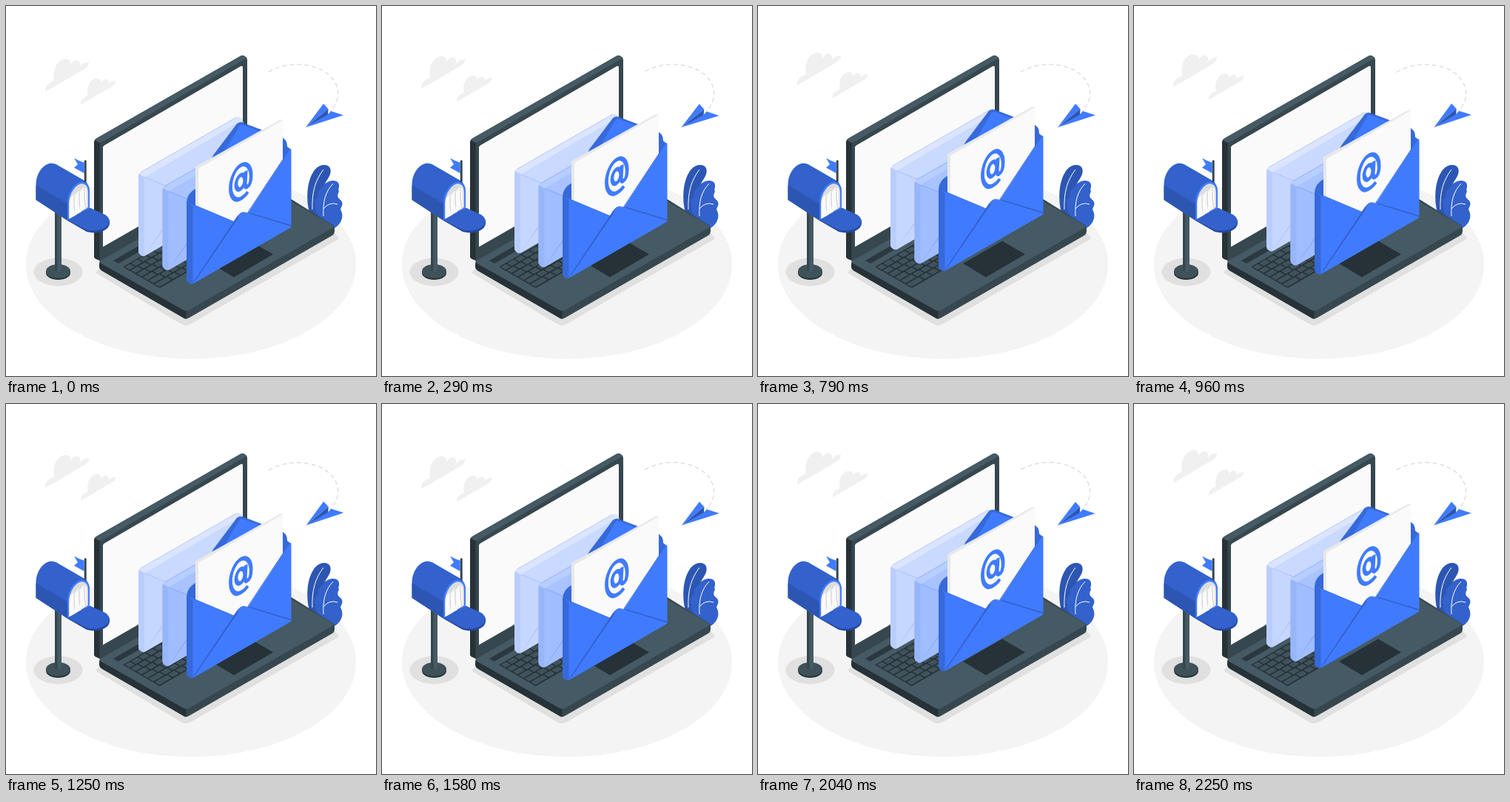
Recreate the animation shown at these times as an HTML page. Size 500 px wide and 500 px high, loop 2290 ms.

```html
<!DOCTYPE html>
<html lang="en">
<head>
<meta charset="utf-8">
<title>Mail</title>
<style>
html, body { margin: 0; width: 100%; height: 100%; overflow: hidden; background: #fff; }
svg { display: block; width: 100%; height: 100%; }
</style>
</head>
<body>
<svg id="stage" viewBox="0 0 500 500">
  <ellipse cx="250" cy="349" rx="223" ry="128" fill="#f4f4f4"/>
  <ellipse cx="70.5" cy="359.5" rx="33" ry="19" fill="#e0e0e0"/>
  <path d="M122 361Q121 358 127 355L443 307Q450 311 449 315L249 430Q243 433.500 237 430Z" fill="#e0e0e0"/>

  <defs>
    <path id="cloud" fill="#f0f0f0" d="M53 116C52 109 57 104 65 101C63 88 67 75 78 72C85 70.500 88 75 87 80C90 74 96 71.500 99 75C101 78 100 81 99 83C102 78 108 75 112 76C112 80 110 83 106 85L62 111C58 113 56 114 53 116Z"/>
  </defs>
  <g class="float" data-rise="10">
    <use href="#cloud"/>
    <use href="#cloud" transform="translate(58.600 40.400) scale(.8)"/>
  </g>

  <g id="plane">
    <path d="M355 89C373 79 392 77 411 81C438 87 452 106 448 125C446 132 443 137 438 142" fill="none" stroke="#e0e0e0" stroke-width="1.500" stroke-dasharray="6 4"/>
    <path d="M405 164L429 132L435.500 139Z" fill="#407bff"/>
    <path d="M405 164L435.500 139L435 147.500Z" fill="#2d56b3"/>
    <path d="M405 164L434.500 147L439 142L456 147.500Z" fill="#407bff"/>
  </g>

  <g id="plant">
    <path d="M411 283C405 262 406 238 416 223C424 212 437 213 438.500 221C440 231 431 235 430 245C431 255 427 275 421 287Z" fill="#2d56b3"/>
    <path d="M414 275C413 252 418 235 429 221" fill="none" stroke="#fff" stroke-width="1"/>
    <path d="M423 286C415 272 416 260 422 257C421 247 427 246 429 243C434 235 446 234 449 239C452 244 448 247 450 251C447 256 448 259 452 262C457 267 453 271 452 275C456 281 456 293 444 300Z" fill="#3362cc"/>
    <path d="M429 284C428 266 431 251 442 240M429 274Q437 264 448 268" fill="none" stroke="#fff" stroke-width="1"/>
  </g>

  <g id="laptop">
    <path d="M127 339L326 224L440 295Q444 297 444 301V305Q444 308 441 310L248 421Q243.500 424 239 421L130 358Q126 355.500 126 352Z" fill="#37474f"/>
    <path d="M126 347L243.500 411V423Q241 422.700 239 421L130 358Q126 355.500 126 352Z" fill="#263238"/>
    <path d="M128 344L326 230L440 295.500Q444 298 440 300.500L248 410.500Q243.500 413 239 410.500L129 348Q126 346 128 344Z" fill="#455a64"/>
    <path d="M145 344L320 243L327 247L152 348Z" fill="#2b383f"/>
    <g id="keys" transform="matrix(.866 -.5 .866 .5 158 352.500)"></g>
    <path d="M277 348L330 317.500L361 335.500L308 366.500Z" fill="#263238"/>
    <path d="M119 184Q119 181 122 179L317 67.500Q319.500 66 322 67.500L324 68.700Q326 70 326 73V229L127 344L121 341.500Q119 340.500 119 338Z" fill="#37474f"/>
    <path d="M119 184Q119 182.500 120 181.500L127.500 186Q126.500 187.500 126.500 190V344L121 341.500Q119 340.500 119 338Z" fill="#263238"/>
    <path d="M120 181Q120.500 180 122 179L317 67.500Q319.500 66 322 67.500L325 70L322 72L128 185Z" fill="#455a64"/>
    <path d="M131 191.500Q131 189.200 133 188.200L317 81.500Q320 80 320 83.500V217L131 325.500Z" fill="#fafafa"/>
  </g>

  <g id="mail"></g>

  <g id="mailbox">
    <ellipse cx="70.500" cy="360.500" rx="16.500" ry="9.500" fill="#263238"/>
    <ellipse cx="70.500" cy="358.500" rx="16.500" ry="9.500" fill="#3f5159"/>
    <path d="M66 278H75V357Q70.500 361 66 357Z" fill="#455a64"/>
    <path d="M66 278H69.500V359Q67 358.500 66 357Z" fill="#37474f"/>
    <path d="M40.500 262V240C41 226 50 214 60 212.500Q64 212 68 214L106 236Q113 241 113 251V272L84 290Z" fill="#3362cc"/>
    <path d="M40.500 262V242L83 267V290Z" fill="#2d56b3"/>
    <path d="M83 290V267C83 252 92 239 102 237.500Q113 238 113 251V272Z" fill="#407bff"/>
    <path d="M85 288V267C85.500 254 93 242 102 240Q110.500 240 111 251V272Z" fill="#dcdcdc"/>
    <g id="post"></g>
    <path d="M83 290L113 273L134 283Q141 287 140 294C139 304 123 309 109 305Z" fill="#2648a0"/>
    <path d="M83 289L113 272.500L134 282Q140 286 139.500 292C138 301 122 306 109 302.500Z" fill="#3362cc"/>
    <path d="M105.700 209Q107.200 207.500 108.700 209V239L105.700 237Z" fill="#37474f"/>
    <path d="M92 205.500Q99 210 105.700 211.500V226L92 218.500L97 214Z" fill="#407bff"/>
  </g>
</svg>
<script>
const LOOP = 2290, STEP = 1000 / 24, PERIOD = 1500, LEAD = 25;
const $ = id => document.getElementById(id);
const path = (d, fill) => `<path d="${d}" fill="${fill}"/>`;
const line = (d, color, width = 1) =>
  `<path d="${d}" fill="none" stroke="${color}" stroke-width="${width}" stroke-linejoin="round"/>`;
const rising = (rise, body) => `<g class="float" data-rise="${rise}">${body}</g>`;

function keyboard() {
  let out = '<rect width="180" height="57.500" rx="1.500" fill="#263238"/>';
  for (let row = 0; row < 6; row++) {
    const y = 1.5 + row * 9.3;
    let x = 1.5;
    for (let i = 0; x < 178; i++) {
      const wide = i === 0 ? 8 + row * 2.2 : row === 5 && i === 4 ? 52 : 10;
      const w = Math.min(wide, 178.5 - x);
      out += `<rect x="${x}" y="${y}" width="${w}" height="7.400" rx="1" fill="#40535c"/>`;
      x += wide + 1.8;
    }
  }
  return out;
}

function closedEnvelope(dx, dy, c) {
  return `<g transform="translate(${dx} ${dy})">` +
    path('M244 267Q244 264 247 262L376 188Q379 187 382 188.500Q385.500 190.500 385.500 195V298.500L254 374.500Q250 376.500 247 374Q244 372 244 369Z', c.face) +
    path('M244 267L245 264.500L252.500 269Q252 271 252 273V375.500Q249 375.500 247 374Q244 372 244 369Z', c.side) +
    path('M245 264.500Q245.500 263 247 262L376 188Q379 187 382 188.500L385 191.500L252.500 269Z', c.top) +
    path('M252.500 269L385 192L325 283Q319 291 311 291Z', c.flap) +
    path('M252.500 374.500L309 290L313 291Z', c.line) +
    line('M252.500 269L311 293Q319 295 325 285L385 193M327 281L385 298', c.line) +
    line('M247 262L376 188', c.line, .8) + '</g>';
}

function atSign() {
  return `<g transform="matrix(.866 -.5 0 1 317.300 237.700)" fill="none" stroke="#407bff" stroke-width="5.500">
    <ellipse cx="-.5" rx="6.800" ry="9.300"/>
    <path d="M11 19C8 21.500 4 22.500 0 22.500A16 22.500 0 1 1 16 0C16 7 14 11.500 10.500 11.500C7 11.500 6.500 8 7 4L8 -11"/></g>`;
}

function openEnvelope() {
  return path('M244 270V265Q245 253 256 247L280.500 201L311 160.500Q315.500 156 321 158.500L375 179Q380 181.500 380 190L385 194L319 298Z', '#3669d9') +
    path('M291 204L316 161Q318 160 321 161L374 181V230Z', '#407bff') +
    line('M311 160.500Q315.500 156 321 158.500L375 179', '#3362cc', .8) +
    path('M256 219Q256 217.500 258 216.500L370 154Q374 152.500 374 156V230L319 300L256 276Z', '#fafafa') +
    path('M256 219Q256 217.500 258 216.500L370 154Q372.500 153 373.500 154.500L262 218.500Q260 220 260 222V276H256Z', '#e8e8e8') +
    atSign() +
    path('M244 268Q246 263 252 268L308 291.500L313 284Q319 276 326 281L383 194Q385.500 190.500 385.500 196V296Q385.500 298.500 383.500 300L254 374.500Q250 376.500 247 374Q244 372 244 369Z', '#407bff') +
    path('M244 268Q245 264.500 248.500 266L252.500 271V375.500Q249 375.500 247 374Q244 372 244 369Z', '#3669d9') +
    path('M252.500 374L308 291L313 284L315 287L257 370Z', '#3362cc') +
    path('M327 278.500L385.500 296V298.500L330 282Z', '#3362cc') +
    path('M253.500 375L313.500 287Q319 278 327 280L385.500 298Q385 299 383.500 300L254 374.500Z', '#407bff') +
    line('M252 268L308 291.500L313 284Q319 276 326 280L383 194', '#3669d9', .9);
}

const pale = { face: '#c6d7ff', side: '#bacdff', top: '#dbe5ff', flap: '#c9d9ff', line: '#adc3fa' };
const soft = { face: '#a0bdff', side: '#97b6fa', top: '#b8ceff', flap: '#a8c3ff', line: '#88a9f4' };

$('keys').innerHTML = keyboard();
$('mail').innerHTML =
  rising(10, closedEnvelope(-65, -37.5, pale)) +
  rising(10, closedEnvelope(-32.5, -18.5, soft)) +
  rising(20, openEnvelope());
$('post').innerHTML = [0, 1, 2].map(i => {
  const x = 86 + i * 7, y = 261 - i * 5;
  return path(`M${x} ${y}L${x + 6} ${y - 8}L${x + 9} ${y - 3}V${y + 22}L${x} ${y + 27}Z`, '#fafafa') +
    line(`M${x + 6} ${y - 7}V${y + 10}L${x + 8} ${y + 22}`, '#c4c4c4', .9);
}).join('');

const floats = [...document.querySelectorAll('.float')];
const plane = $('plane');
// Triangle wave: 0 at the start of a period, 1 halfway through.
const tri = t => 1 - Math.abs(1 - 2 * ((t / PERIOD) % 1));
const lift0 = tri(LEAD);

function draw(now) {
  const t = Math.floor((now % LOOP + 5) / STEP) % 55 * STEP;
  const lift = tri(t + LEAD) - lift0;
  for (const g of floats) g.setAttribute('transform', `translate(0 ${(-lift * g.dataset.rise).toFixed(3)})`);
  const sway = 2 * tri(t + PERIOD / 4) - 1;
  plane.setAttribute('transform', `rotate(${sway.toFixed(3)} 405 121)`);
}

const start = performance.now();
(function tick() {
  draw(performance.now() - start);
  requestAnimationFrame(tick);
})();
</script>
</body>
</html>
```
